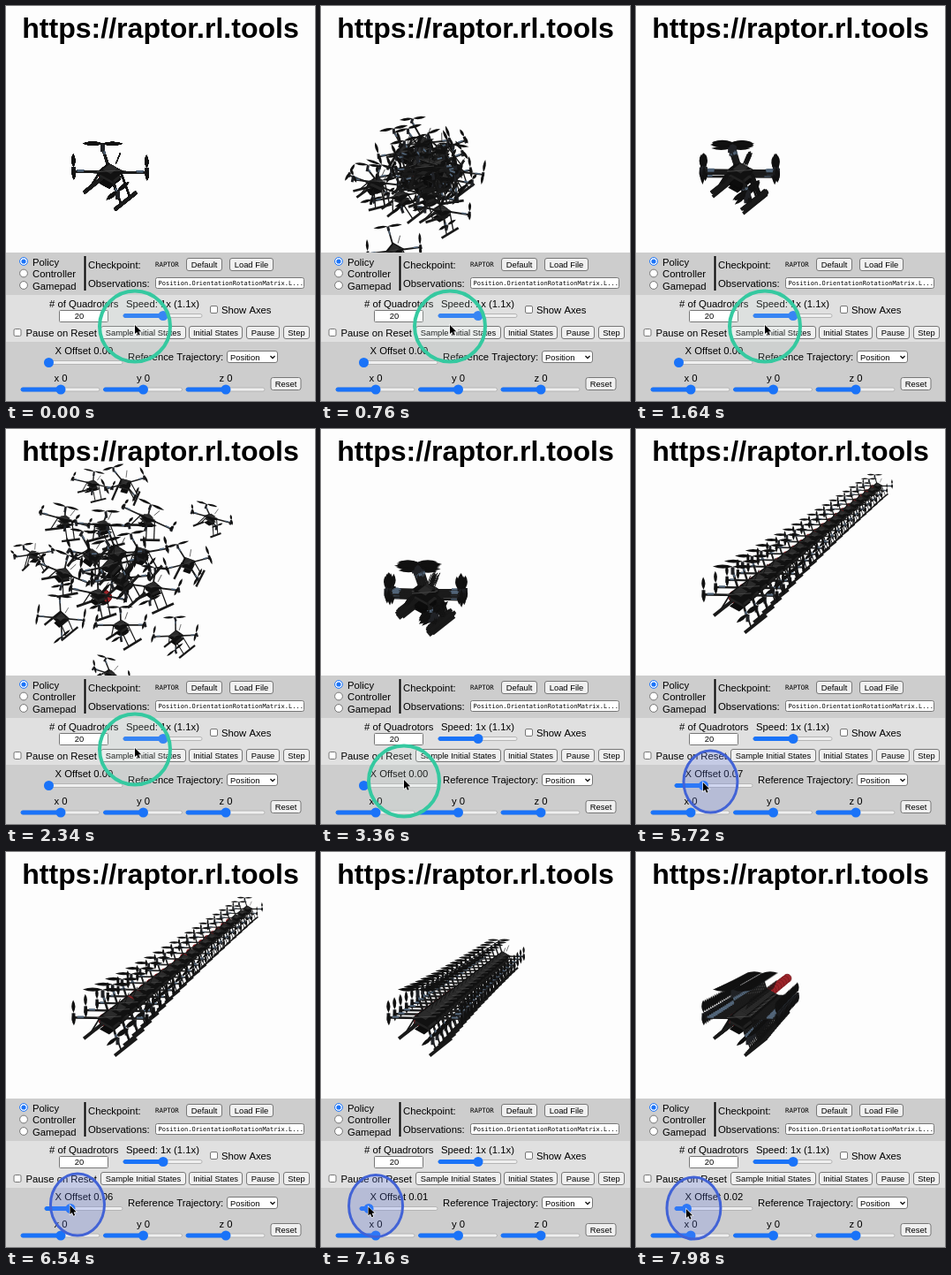
An HTML page with a canvas for the animation above (8 s loop, 350x447 px).

```html
<!DOCTYPE html>
<html lang="en">
<head>
<meta charset="utf-8">
<title>Quadrotor playground</title>
<style>
  html, body { margin: 0; width: 100%; height: 100%; overflow: hidden; background: #fdfdfd; }
  canvas { display: block; }
</style>
</head>
<body>
<canvas id="stage" width="350" height="447"></canvas>
<script>
const ctx = document.getElementById('stage').getContext('2d');
const LOOP = 8, COUNT = 20;
const SANS = '"Liberation Sans", Arial, sans-serif';
const MONO = '"DejaVu Sans Mono", monospace';
const BLUE = '#1a73f8';

// ---------- helpers ----------
const lerp = (a, b, k) => a + (b - a) * k;
const clamp01 = v => Math.min(1, Math.max(0, v));

// Eased interpolation through [time, value] pairs.
function track(t, keys) {
  if (t <= keys[0][0]) return keys[0][1];
  for (let i = 1; i < keys.length; i++) {
    const [t0, v0] = keys[i - 1], [t1, v1] = keys[i];
    if (t <= t1) {
      const k = (t - t0) / (t1 - t0);
      return lerp(v0, v1, k * k * (3 - 2 * k));
    }
  }
  return keys[keys.length - 1][1];
}

// Seeded value in -1..1.
function random(seed) {
  const v = Math.sin(seed * 127.1 + 11.7) * 43758.5453;
  return (v - Math.floor(v)) * 2 - 1;
}

function text(str, x, y, size = 11.3, align = 'left', family = SANS, weight = '') {
  ctx.font = `${weight} ${size}px ${family}`;
  ctx.textAlign = align;
  ctx.fillStyle = '#000';
  ctx.fillText(str, x, y);
}

function box(x, y, w, h, fill, stroke, radius = 2.5) {
  ctx.beginPath();
  ctx.roundRect(x, y, w, h, radius);
  ctx.fillStyle = fill;
  ctx.fill();
  ctx.strokeStyle = stroke;
  ctx.lineWidth = 1;
  ctx.stroke();
}

function oval(x, y, rx, ry, fill, stroke, width = 1) {
  ctx.beginPath();
  ctx.ellipse(x, y, rx, ry, 0, 0, Math.PI * 2);
  ctx.fillStyle = fill;
  ctx.fill();
  if (!stroke) return;
  ctx.strokeStyle = stroke;
  ctx.lineWidth = width;
  ctx.stroke();
}
const disc = (x, y, r, ...paint) => oval(x, y, r, r, ...paint);

// ---------- quadrotor ----------
const AXES = [[165, -131], [-250, -137], [0, -230]];   // screen pixels per metre
const ARM = 0.1;

function projector({ x, y, size, roll = 0, pitch = 0, yaw = 0 }) {
  const turn = (a, b, angle) => {
    const c = Math.cos(angle), s = Math.sin(angle);
    return [a * c - b * s, a * s + b * c];
  };
  return (px, py, pz) => {
    [px, py] = turn(px, py, yaw);
    [px, pz] = turn(px, pz, pitch);
    [py, pz] = turn(py, pz, roll);
    return [0, 1].map(k =>
      [x, y][k] + size * (px * AXES[0][k] + py * AXES[1][k] + pz * AXES[2][k]));
  };
}

function drawQuad(pose) {
  const at = projector(pose), s = pose.size;
  const line = (a, b, width, color = '#141414') => {
    ctx.beginPath();
    ctx.moveTo(...at(...a));
    ctx.lineTo(...at(...b));
    ctx.lineWidth = width * s;
    ctx.strokeStyle = color;
    ctx.stroke();
  };
  const plate = (hx, hy, z, color) => {
    ctx.beginPath();
    [[hx, hy], [hx, -hy], [-hx, -hy], [-hx, hy]].forEach(([x, y]) => ctx.lineTo(...at(x, y, z)));
    ctx.closePath();
    ctx.fillStyle = color;
    ctx.fill();
  };
  const blade = (x, y, z, angle) => {
    const [x0, y0] = at(x, y, z);
    const [x1, y1] = at(x + 0.077 * Math.cos(angle), y + 0.077 * Math.sin(angle), z);
    const mx = (x0 + x1) / 2, my = (y0 + y1) / 2;
    const length = Math.hypot(x1 - x0, y1 - y0) || 1;
    const nx = (y0 - y1) / length * 4.2 * s, ny = (x1 - x0) / length * 4.2 * s;
    ctx.beginPath();
    ctx.moveTo(x0, y0);
    ctx.quadraticCurveTo(mx + nx, my + ny, x1, y1);
    ctx.quadraticCurveTo(mx - nx, my - ny, x0, y0);
    ctx.fillStyle = '#111';
    ctx.fill();
  };

  for (const side of [0.07, -0.07]) {
    for (const x of [-0.03, 0.03]) line([x, side * 0.4, 0], [x, side, -0.1], 1.8);
    line([-0.075, side, -0.1], [0.075, side, -0.1], 3.8, '#191919');
  }
  plate(0.04, 0.022, -0.045, '#0c0c0c');
  plate(0.03, 0.032, -0.022, '#222');

  const rotors = [[1, 1, -0.775], [1, -1, 0.6], [-1, 1, 0.6], [-1, -1, 0]]
    .map(([x, y, angle]) => [x * ARM, y * ARM, angle]);
  for (const [x, y] of rotors) {
    line([0, 0, 0], [x, y, 0], 2.6, '#1b1b1b');
    line([x * 0.72, y * 0.72, 0.004], [x * 0.9, y * 0.9, 0.004], 2.2, '#526579');
  }
  plate(0.04, 0.035, 0, '#111');
  plate(0.024, 0.018, 0.016, '#2b2b2b');
  line([-0.045, 0.03, 0.01], [0.03, -0.03, 0.01], 1, '#454545');
  line([0.04, 0, 0.02], [0.07, 0, 0.055], 1);
  for (const [x, y, angle] of rotors) {
    line([x, y, -0.015], [x, y, 0.022], 4, '#202226');
    blade(x, y, 0.024, angle);
    blade(x, y, 0.024, angle + Math.PI);
  }
}

// ---------- swarm ----------
const HOME = [118, 188], GOAL = [112, 190];
const LAG = 0.3;   // the swarm follows the goals with this delay

// Each click scatters the swarm; the layout describes it at the time `at`.
const BURSTS = [
  { start: 0.1, at: 0.76, centre: [120, 183], radius: 52, drift: [-40, 75], shrink: 0.1 },
  { start: 2, at: 2.34, centre: [122, 152], radius: 125, drift: [40, 20], shrink: 0.3 }
];

const settle = s => (1 + s / 0.25) * Math.exp(-s / 0.25);

const offsetAt = t => track(t, [[4.45, 0], [5.2, .065], [6.3, .065], [7.3, .01], [7.6, .01], [8.3, .029]]);

function alongX(origin, metres) {
  const k = metres / (1 + 0.25 * metres);
  return {
    x: origin[0] + AXES[0][0] * k,
    y: origin[1] + AXES[0][1] * k,
    size: 1 / (1 + 1.25 * metres),
    depth: metres
  };
}

function quadPose(i, t) {
  const pose = alongX(HOME, i * offsetAt(t - LAG));
  const burst = BURSTS.findLast(b => t >= b.start);
  if (!burst) return pose;

  const { start, at, centre, radius, drift, shrink } = burst;
  const spread = settle(t - start) / settle(at - start), near = Math.min(1, spread);
  const rank = (i + 0.5) / COUNT, angle = i * 2.4 + 2.6;   // golden-angle spiral
  const reach = radius * rank ** 0.9, stray = rank ** 6;
  const away = [Math.cos(angle), Math.sin(angle)]
    .map((dir, k) => centre[k] + dir * reach + drift[k] * stray - HOME[k]);
  const tilt = n => random(i * 7 + n + start) * near;
  return {
    x: pose.x + away[0] * spread,
    y: pose.y + away[1] * spread,
    size: pose.size * lerp(1, 0.82 - shrink * rank, near),
    depth: pose.depth + 0.05 * rank * near,
    roll: 0.35 * tilt(1), pitch: 0.35 * tilt(2), yaw: 0.4 * tilt(3)
  };
}

function drawBall({ x, y, size }) {
  disc(x, y, 7 * size, '#9c2429', '#76191d', 0.8);
}

function drawScene(t) {
  ctx.fillStyle = '#fdfdfd';
  ctx.fillRect(0, 0, 350, 447);
  const items = [];
  for (let i = 0; i < COUNT; i++) {
    const ball = alongX(GOAL, i * offsetAt(t));
    items.push({ ...quadPose(i, t), draw: drawQuad });
    items.push({ ...ball, depth: ball.depth + 0.02, draw: drawBall });
  }
  items.sort((a, b) => b.depth - a.depth).forEach(item => item.draw(item));
  text('https://raptor.rl.tools', 175, 36, 32.1, 'center', SANS, 'bold');
}

// ---------- controls ----------
function button(label, x, y, w) {
  box(x + .5, y + .5, w - 1, 14, '#f0f0f0', '#777');
  text(label, x + w / 2, y + 11, 9.4, 'center');
}

function checkbox(label, x, y, labelX) {
  box(x + .5, y + .5, 8, 8, '#fff', '#767676', 1.5);
  text(label, labelX, y + 8.5);
}

function radio(label, y, checked) {
  disc(20, y, 4.4, '#fff', checked ? BLUE : '#767676');
  if (checked) disc(20, y, 2.6, BLUE);
  text(label, 30, y + 4.5);
}

function slider(x, y, w, thumb) {
  box(x, y - 2, w, 4, '#efefef', '#b5b5b5', 2);
  box(x, y - 2, thumb - x, 4, BLUE, BLUE, 2);
  disc(thumb, y, 5.5, BLUE);
}

function drawControls(offset) {
  [[279, 48, '#cdcdcd'], [327, 53, '#e0e0e0'], [380, 67, '#cdcdcd']].forEach(([y, h, color]) => {
    ctx.fillStyle = color;
    ctx.fillRect(0, y, 350, h);
  });

  ['Policy', 'Controller', 'Gamepad'].forEach((name, i) => radio(name, 289 + i * 13.5, i === 0));
  ctx.fillStyle = '#000';
  ctx.fillRect(88.5, 283, 2, 39);
  text('Checkpoint:', 93, 297);
  text('RAPTOR', 169, 295, 7.4, 'left', MONO);
  button('Default', 204, 285, 41);
  button('Load File', 253, 285, 50);
  text('Observations:', 93, 318);
  box(169.5, 307.5, 168, 12, '#fff', '#777', 2);
  text('Position.OrientationRotationMatrix.L...', 172.5, 316, 7, 'left', MONO);

  text('# of Quadrotors', 49, 341);
  box(60.5, 344.5, 55, 13, '#fff', '#777', 1);
  text('20', 83, 354, 9.4, 'center');
  text('Speed: 1x (1.1x)', 136, 341);
  slider(133, 350.5, 89, 178);
  checkbox('Show Axes', 231, 339, 244);
  checkbox('Pause on Reset', 8.5, 365, 22.5);
  button('Sample Initial States', 107, 362, 97);
  button('Initial States', 207, 362, 61);
  button('Pause', 272, 362, 38);
  button('Step', 314, 362, 30);

  text(`X Offset ${offset.toFixed(2)}`, 55.5, 394);
  slider(44, 403.5, 88, 48.5 + 430 * offset);
  text('Reference Trajectory:', 138, 401);
  box(250.5, 390.5, 57, 13, '#fff', '#777');
  text('Position', 254, 400.5, 9.4);
  ctx.beginPath();
  ctx.moveTo(299.5, 396);
  ctx.lineTo(302, 398.7);
  ctx.lineTo(304.5, 396);
  ctx.strokeStyle = '#000';
  ctx.lineWidth = 1.2;
  ctx.stroke();

  ['x', 'y', 'z'].forEach((name, i) => {
    const x = 17 + i * 93.5;
    text(`${name} 0`, x + 45, 424.5, 11.3, 'center');
    slider(x, 434, 89, x + 45);
  });
  button('Reset', 299.5, 420, 35);
}

// ---------- pointer ----------
function drawPointer(t, offset) {
  const dragging = clamp01((t - 3.85) / 0.1);
  const click = Math.max(...BURSTS.map(b => clamp01(1 - Math.abs(t - b.start) / 0.08)));
  const press = Math.max(dragging, click);
  const pressed = press > 0.5;
  const x = track(t, [[2.95, 146], [3.36, 94], [3.75, 48]]) + 430 * offset;
  const y = track(t, [[2.95, 361], [3.36, 397], [3.75, 400], [6.8, 400], [7.7, 404]]);
  oval(x + 8.5 * dragging, y + lerp(1.5, -1, dragging), lerp(40, 30.5, press), lerp(40, 35, press),
    pressed ? 'rgba(110,135,240,.24)' : 'rgba(205,225,218,.16)',
    pressed ? '#4263d6' : '#35c9a0', lerp(4, 3, press));

  ctx.beginPath();
  [[0, 0], [0, 10], [2.3, 8], [4, 11.8], [5.7, 11], [4.1, 7.4], [7.2, 7.2]]
    .forEach(([dx, dy]) => ctx.lineTo(x + dx, y + dy));
  ctx.closePath();
  ctx.strokeStyle = '#fff';
  ctx.lineWidth = 1.2;
  ctx.stroke();
  ctx.fillStyle = '#000';
  ctx.fill();
}

function render(now) {
  const t = now / 1000 % LOOP, offset = offsetAt(t);
  drawScene(t);
  drawControls(offset);
  drawPointer(t, offset);
  requestAnimationFrame(render);
}
requestAnimationFrame(render);
</script>
</body>
</html>
```
